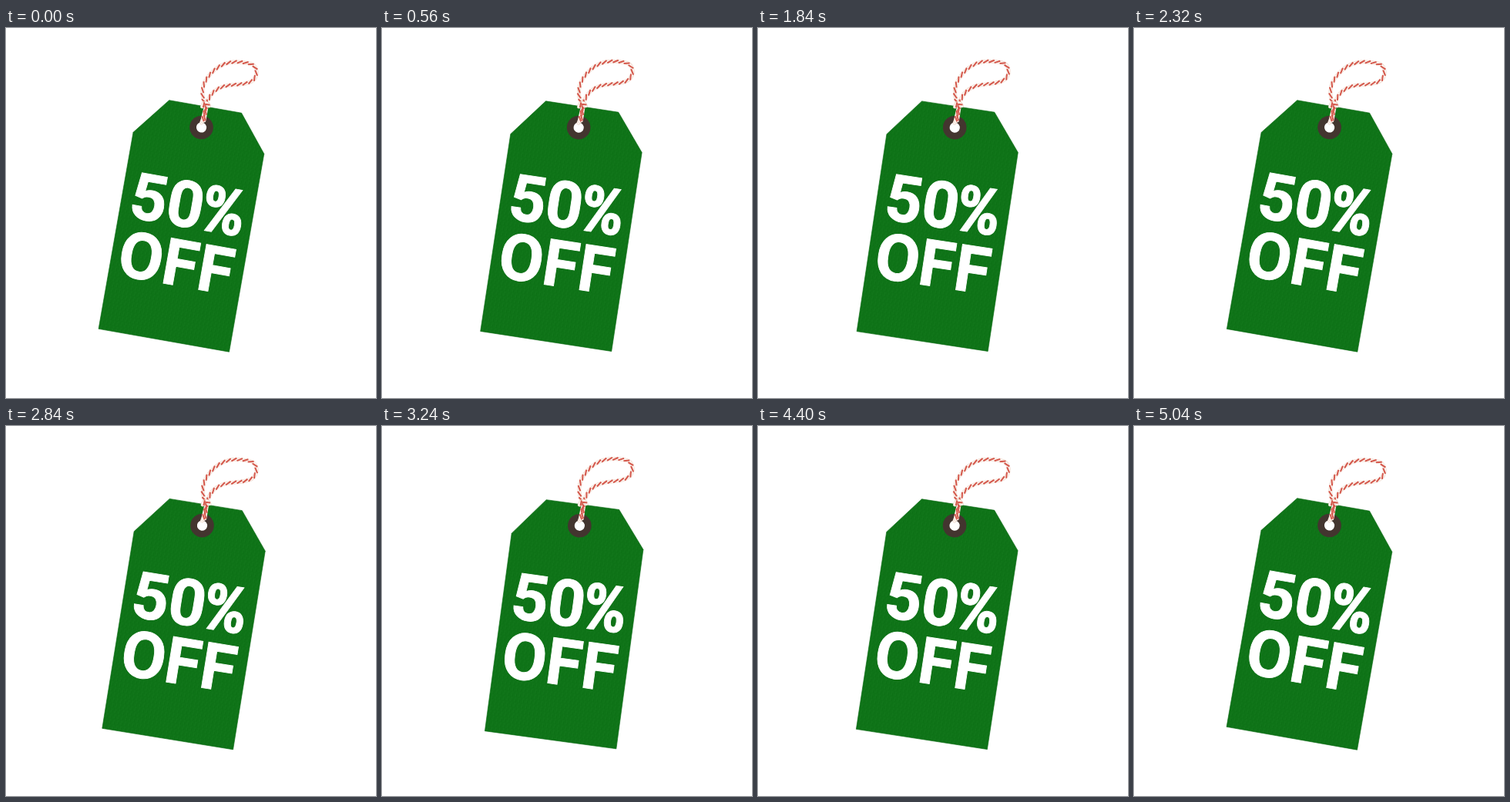
Recreate the animation shown at these times as an HTML page. Size 480 px wide and 480 px high, loop 5.08 s.

```html
<!DOCTYPE html>
<html lang="en">
<head>
<meta charset="utf-8">
<title>50% off</title>
<style>
  html, body { margin: 0; width: 100%; height: 100%; overflow: hidden; background: #fff; }
  svg { display: block; width: 100vw; height: 100vh; }
  text {
    font: 700 84px Roboto, "Open Sans", sans-serif;
    fill: #fff; stroke: #fff; stroke-width: .9;
  }
  .narrow { font-family: "Noto Sans Mono", "DejaVu Sans Mono", monospace; }
  .cord { fill: none; stroke-linecap: round; stroke-linejoin: round; }
  .edge { stroke: #ecd3c7; stroke-width: 4.8; }
  .core { stroke: #fcf5ef; stroke-width: 3.8; }
  .twist { stroke: #d4584c; stroke-width: 2; fill: none; }
</style>
</head>
<body>
<svg viewBox="0 0 480 480">
  <defs>
    <pattern id="weave" width="5" height="7" patternUnits="userSpaceOnUse">
      <rect width="5" height="7" fill="#0f7418"/>
      <path d="M1 0V4M3.5 3V7" stroke="#086710" stroke-width=".8" opacity=".5"/>
      <path d="M2.3 1V6" stroke="#1a8024" stroke-width=".7" opacity=".4"/>
    </pattern>
  </defs>
  <g id="swing">
    <g transform="translate(253.5 129) rotate(10)">
      <path d="M-47.3-27.5H48L86 19.6V280.5H-86V21.6Z" fill="url(#weave)" stroke="#0b6a13" stroke-width=".6"/>
      <text y="131" x="-75 -27 22">50<tspan class="narrow">%</tspan></text>
      <text y="207.8" x="-76.5 -19 27.4">OFF</text>
      <circle r="15.3" fill="#43352f"/>
      <circle r="6.6" fill="#fff"/>
    </g>
    <g id="cords"></g>
  </g>
</svg>
<script>
const NS = "http://www.w3.org/2000/svg";
const LOOP = 5080, STEP = 40, SWAY = -2.95;
const PIVOT = "262 58";
const turns = [0, 1210, 2420, 3620, 5040]; // alternating ends of the swing

const strands = [
  "M260 100C258 111 256 117 253.5 123",
  "M255 121C256 112 259 104 261 97C264 86 272 78 285 75C298 72.5 314 74 321 67.5C328 60 326 48 316 46C306 44 297 43 289 45C274 48 260 62 256 75C253 85 255 93 260 103L257 120",
  "M254.5 102C256 96 261 96 263.5 101"
];

function add(parent, cls, d) {
  const p = document.createElementNS(NS, "path");
  p.setAttribute("class", cls);
  p.setAttribute("d", d);
  parent.append(p);
  return p;
}

// Slanted red strokes along a strand give the twisted look.
function twist(path) {
  const len = path.getTotalLength();
  let d = "";
  for (let s = 3; s < len - 1; s += 7.4) {
    const a = path.getPointAtLength(Math.max(0, s - 3.6));
    const b = path.getPointAtLength(Math.min(len, s + 3.6));
    const l = Math.hypot(b.x - a.x, b.y - a.y) || 1;
    const nx = -(b.y - a.y) / l * 1.7, ny = (b.x - a.x) / l * 1.7;
    d += `M${a.x + nx} ${a.y + ny}L${b.x - nx} ${b.y - ny}`;
  }
  return d;
}

const cords = document.getElementById("cords");
for (const d of strands) {
  add(cords, "cord edge", d);
  const core = add(cords, "cord core", d);
  add(cords, "twist", twist(core));
}

function angle(t) {
  if (t >= turns[turns.length - 1]) return 0;
  const i = turns.findIndex((end, k) => k && t < end) - 1;
  const p = (t - turns[i]) / (turns[i + 1] - turns[i]);
  const eased = (1 - Math.cos(Math.PI * p)) / 2;
  return SWAY * (i % 2 ? 1 - eased : eased);
}

const swing = document.getElementById("swing");
const start = performance.now();

function draw() {
  const t = (performance.now() - start) % LOOP;
  const held = Math.floor(t / STEP) * STEP;
  swing.setAttribute("transform", `rotate(${angle(held)} ${PIVOT})`);
  requestAnimationFrame(draw);
}
draw();
</script>
</body>
</html>
```
